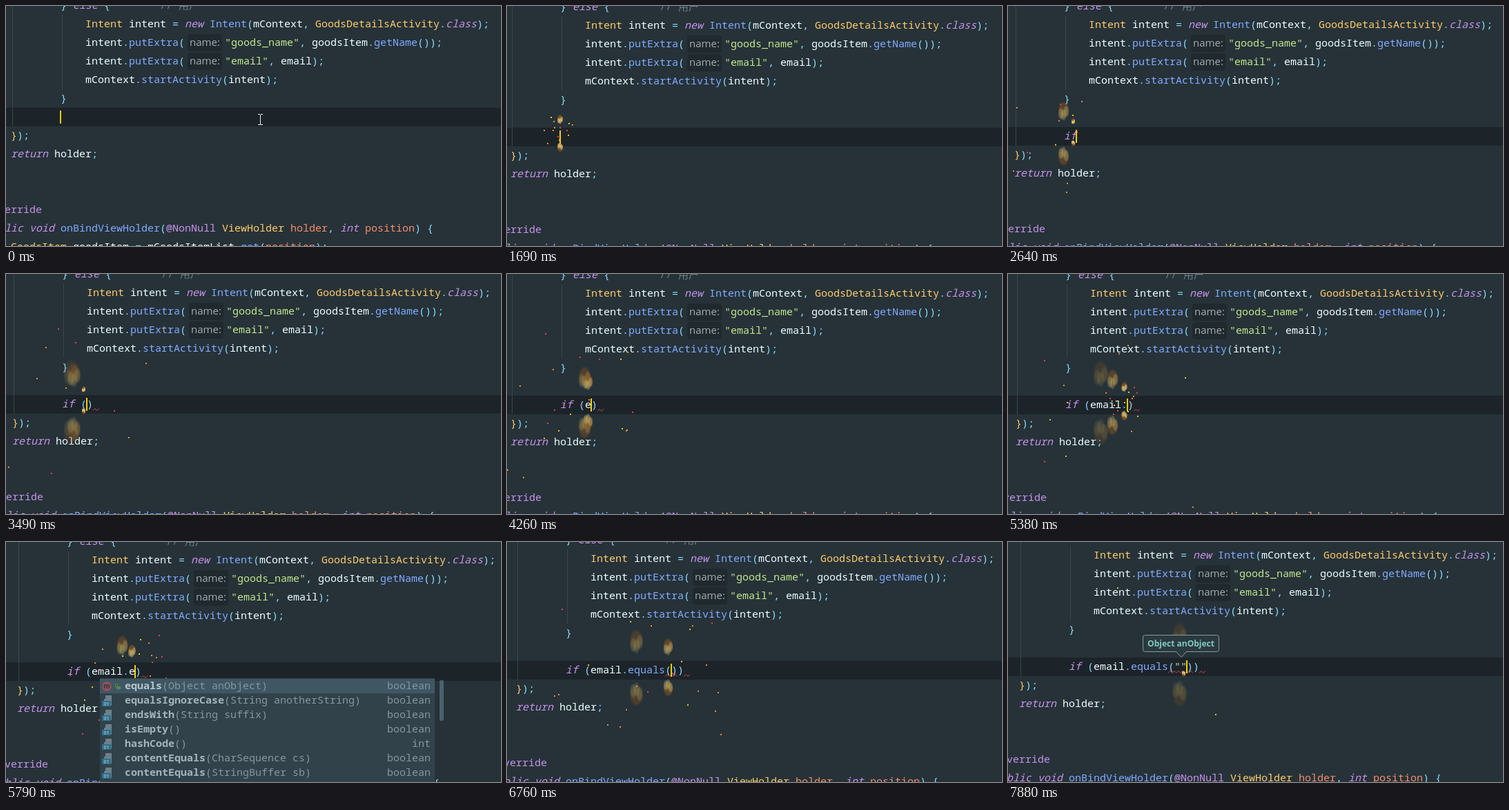
An HTML page with a canvas for the animation above (8 s loop, 717 px wide and 349 px high).

```html
<!DOCTYPE html>
<html lang="en">
<head>
<meta charset="utf-8">
<title>Typing with sparks</title>
<style>
html, body { margin: 0; width: 100%; height: 100%; overflow: hidden; background: #263238; }
canvas { display: block; }
</style>
</head>
<body>
<canvas id="stage" width="717" height="349"></canvas>
<script>
const ctx = document.getElementById('stage').getContext('2d');
const LOOP = 8000, CW = 9, ROW = 27, TOP = 13, LEFT = 79;
const ENTER = 1420, FLAME_LIFE = 950, SPARKS = 13;
const MONO = '"Noto Sans Mono", "DejaVu Sans Mono", "Noto Sans CJK SC", monospace';
const SANS = '"Open Sans", "Noto Sans", sans-serif';
const INK = {
  k: '#c792ea', t: '#ffcb6b', f: '#82aaff', v: '#eeffff',
  p: '#89ddff', s: '#c3e88d', a: '#f78c6c', c: '#6b8089', n: '#c792ea'
};
const SPARK_INKS = ['#ee4035', '#ef8a32', '#ef8a32', '#f5c211'];

// The picture only changes on ticks, evenly spread within each stretch: first, last, count
const ticks = [0, 410, 1020];
for (const [from, to, n] of [[1420, 2390, 8], [2510, 2640, 2], [2760, 3490, 6],
  [3720, 5790, 16], [5910, 6760, 7], [6920, 7880, 8]]) {
  for (let i = 0; i < n; i++) ticks.push(Math.round(from + (to - from) * i / (n - 1)));
}

// Code: "~x" switches the ink, "#" is the inlay hint
const above = [
  [-1, 79, '~p} ~kelse ~p{'],
  [-1, 223, '~c// 用户'],
  [0, 115, '~tIntent ~vintent ~p= ~knew ~fIntent~p(~vmContext~p, ~tGoodsDetailsActivity~p.~kclass~p);'],
  [1, 115, '~vintent~p.~fputExtra~p(#~s"goods_name"~p, ~vgoodsItem~p.~fgetName~p());'],
  [2, 115, '~vintent~p.~fputExtra~p(#~s"email"~p, ~vemail~p);'],
  [3, 115, '~vmContext~p.~fstartActivity~p(~vintent~p);'],
  [4, 79, '~p}']
];
const below = [
  [6, 7, '~t}~p);'],
  [7, 7, '~kreturn ~vholder~p;'],
  [10, -29, '~n@Override'],
  [11, -29, '~kpublic void ~fonBindViewHolder~p(~n@NonNull ~tViewHolder ~aholder~p, ~kint ~aposition~p) {'],
  [12, 7, '~tGoodsItem ~vgoodsItem ~p= ~vmGoodsItemList~p.~fget~p(~aposition~p);']
];

// Keystrokes: time, line with "|" as caret, shake
const keys = [
  [0, '|', 0, 0],
  [ENTER, '|', -2, 2],
  [2110, 'i|', -3, -1],
  [2640, 'if|', 2, 1],
  [2760, 'if |', -3, 2],
  [3490, 'if (|)', 2, 1],
  [3720, 'if (e|)', -2, 2],
  [4400, 'if (em|)', 1, -2],
  [4540, 'if (ema|)', -3, 1],
  [4820, 'if (email|)', -4, -2],
  [5220, 'if (email.|)', 4, 2],
  [5500, 'if (email.e|)', 9, 0],
  [6050, 'if (email.eq|)', 5, 2],
  [6320, 'if (email.equals(|))', 6, -2],
  [7050, 'if (email.equals("|"))', 12, -3],
  [7330, 'if (email.equals("|"))', 9, -7],
  [7880, 'if (email.equals(""|))', 9, -7]
].map(([t, src, dx, dy]) => ({ t, line: src.replace('|', ''), col: src.indexOf('|'), dx, dy }));

// Keys that moved the caret set off a flame and sparks in the cell just typed
const strokes = keys.filter((k, i) => i && (k.t === ENTER || k.col !== keys[i - 1].col))
  .map(k => ({ t: k.t, x: LEFT + Math.max(0, k.col - 0.5) * CW + k.dx }));

const rand = n => {
  const v = Math.sin(n * 127.1 + 11.7) * 43758.5453;
  return v - Math.floor(v);
};

const markup = line => line.replace(/(\bif\b)|(equals)|("+)|(\w+)|([^\w"]+)/g,
  (s, ...hit) => '~' + 'kfsvp'[hit.findIndex(h => h)] + s);

function text(s, x, y, font, ink, align = 'left') {
  ctx.font = font;
  ctx.fillStyle = ink;
  ctx.textAlign = align;
  ctx.fillText(s, x, y);
}

function box(x, y, w, h, r, fill, stroke) {
  ctx.beginPath();
  ctx.roundRect(x, y, w, h, r);
  ctx.fillStyle = fill;
  ctx.fill();
  if (stroke) { ctx.strokeStyle = stroke; ctx.stroke(); }
}

function rect(x, y, w, h, ink) {
  ctx.fillStyle = ink;
  ctx.fillRect(x, y, w, h);
}

function codeLine(row, x, src) {
  const top = TOP + row * ROW;
  for (const part of src.split(/(?=~)/)) {
    if (!part) continue;
    const kind = part[1], hint = part.endsWith('#');
    const s = part.slice(2, hint ? -1 : undefined);
    text(s, x, top + 18, (kind === 'k' ? 'italic ' : '') + '15px ' + MONO, INK[kind]);
    x += s.length * CW;
    if (hint) {
      box(x + 4, top + 1, 50, 25, 4, '#20292e');
      text('name:', x + 7, top + 18, '15px ' + SANS, '#a0aeb3');
      x += 58;
    }
  }
}

function wave(from, to, y) {
  ctx.beginPath();
  for (let x = LEFT + from * CW, i = 0; x <= LEFT + to * CW; x += 3, i++) {
    ctx.lineTo(x, y + (i % 2 ? -1.5 : 1.5));
  }
  ctx.strokeStyle = '#d9404f';
  ctx.lineWidth = 1;
  ctx.stroke();
}

function editor(t, key) {
  const extra = t >= ENTER ? 1 : 0, cur = 5 + extra, top = TOP + cur * ROW;
  const { line, col } = key;
  ctx.save();
  ctx.translate(key.dx, key.dy);
  rect(-40, top, 800, ROW, '#1c2429');
  rect(9, -30, 1, top + ROW + 30, '#37474f');
  rect(81, TOP, 1, ROW * 4, '#37474f');
  above.forEach(l => codeLine(...l));
  below.forEach(([r, x, s]) => codeLine(r + extra, x, s));
  codeLine(cur, LEFT, markup(line));
  if (line.includes('(')) wave(line.length, line.length + 1, top + 21);
  if (line.includes('equals')) wave(line.indexOf('s(') + 1, col + 1, top + 21);
  if (t < 410 || t >= 1020) rect(78 + col * CW, top + 4, 2, 19, '#ffcc00');
  ctx.restore();
}

function glow(x, y, rx, ry, rgb, alpha) {
  ctx.save();
  ctx.translate(x, y);
  ctx.scale(rx, ry);
  const g = ctx.createRadialGradient(0, 0, 0, 0, 0, 1);
  g.addColorStop(0, `rgba(${rgb},${alpha})`);
  g.addColorStop(0.7, `rgba(${rgb},${alpha * 0.85})`);
  g.addColorStop(1, `rgba(${rgb},0)`);
  ctx.fillStyle = g;
  ctx.fillRect(-1, -1, 2, 2);
  ctx.restore();
}

// Rust at the tip, pale upright lobes at the base; dir -1 burns up, 1 down
function flame(x, base, dir, s) {
  const w = 6 + 18 * s, h = 9 + 35 * s, a = (1 - s) ** 0.6;
  const pale = [250, 222, 135].map((c, i) => Math.round(c + ([135, 135, 85][i] - c) * s));
  glow(x, base + dir * h * 0.55, w * 0.52, h * 0.46, '150,88,26', a * 0.85);
  for (const side of [-1, 1, 0]) {
    const up = side ? 0.42 + 0.06 * side : 0.3;
    glow(x + side * w * 0.24, base + dir * h * up, w * 0.26, h * 0.32, pale, a * 0.7);
  }
}

function sparks(t, stroke, seed) {
  for (let i = 0; i < SPARKS; i++) {
    const n = seed * 100 + i * 5;
    const age = (t - stroke.t) / 1000;
    if (age <= 0 || age > 0.5 + 0.5 * rand(n)) continue;
    const x = stroke.x + (rand(n + 1) - 0.5) * 380 * age;
    const y = 182 + (rand(n + 2) - 0.6) * 330 * age + 70 * age * age;
    rect(Math.round(x) - 1, Math.round(y) - 1, 2, 2, SPARK_INKS[Math.floor(rand(n + 3) * 4)]);
  }
}

function effects(t, key) {
  const mid = 188 + key.dy;
  strokes.forEach((stroke, i) => {
    const s = (t - stroke.t) / FLAME_LIFE;
    if (s >= 0 && s < 1) {
      flame(stroke.x, mid - 17 - 9 * s, -1, s);
      flame(stroke.x, mid + 6 + 16 * s, 1, s);
    }
    sparks(t, stroke, i);
  });
}

const methods = [
  ['equals', '(Object anObject)', 'boolean'],
  ['equalsIgnoreCase', '(String anotherString)', 'boolean'],
  ['endsWith', '(String suffix)', 'boolean'],
  ['isEmpty', '()', 'boolean'],
  ['hashCode', '()', 'int'],
  ['contentEquals', '(CharSequence cs)', 'boolean'],
  ['contentEquals', '(StringBuffer sb)', 'boolean']
];

function popup() {
  rect(136, 198, 485, 151, '#32424a');
  rect(136, 199, 485, 21, '#3f5763');
  methods.forEach(([name, args, type], i) => {
    const y = 214 + i * 21;
    text(name, 172, y, 'bold 15px ' + MONO, i ? '#a3b4bc' : '#b4c6ce');
    text(args, 172 + name.length * CW, y, '15px ' + MONO, '#84969f');
    text(type, 615, y, '15px ' + MONO, '#84969f', 'right');
    if (i) {
      rect(142, y - 12, 11, 15, '#6b818c');
      rect(139, y - 12, 5, 5, '#32424a');
      rect(139, y - 4, 13, 8, '#2f6f8b');
      text('01', 145.5, y + 3, 'bold 7px ' + SANS, '#8fb4c4', 'center');
    }
  });
  box(139, 203, 14, 14, 7, '#94505c');
  text('m', 146, 213, 'bold 10px ' + SANS, '#2c3a41', 'center');
  rect(160, 210, 6, 4, '#568a4c');
  ctx.strokeStyle = '#568a4c';
  ctx.lineWidth = 1;
  ctx.strokeRect(158.5, 206.5, 3, 4);
  box(628, 201, 6, 59, 2, '#4b626d');
}

function tooltip() {
  const edge = '#7f9c9f', fill = '#2b393f';
  ctx.lineWidth = 1;
  box(195.5, 135.5, 110, 24, 3, fill, edge);
  ctx.beginPath();
  ctx.moveTo(243, 159);
  ctx.lineTo(251, 167.5);
  ctx.lineTo(259, 159);
  ctx.fillStyle = fill;
  ctx.fill();
  ctx.stroke();
  text('Object anObject', 250.5, 152, 'bold 12px ' + SANS, '#80cbc4', 'center');
}

function pointer() {
  const ink = '#e8eef0';
  rect(367, 158, 3, 15, '#1c2429');
  rect(368, 158, 1, 15, ink);
  for (const y of [157, 172]) {
    rect(365, y, 3, 1, ink);
    rect(369, y, 3, 1, ink);
  }
}

function draw(now) {
  const time = now % LOOP;
  const t = ticks.findLast(k => k <= time) ?? 0;
  const key = keys.findLast(k => k.t <= t);
  rect(0, 0, 717, 349, '#263238');
  editor(t, key);
  if (t < ENTER) pointer();
  else effects(t, key);
  if (t >= 5640 && t < 6320) popup();
  if (t >= 7460) tooltip();
}

const start = performance.now();
function loop() {
  draw(performance.now() - start);
  requestAnimationFrame(loop);
}
loop();
</script>
</body>
</html>
```
